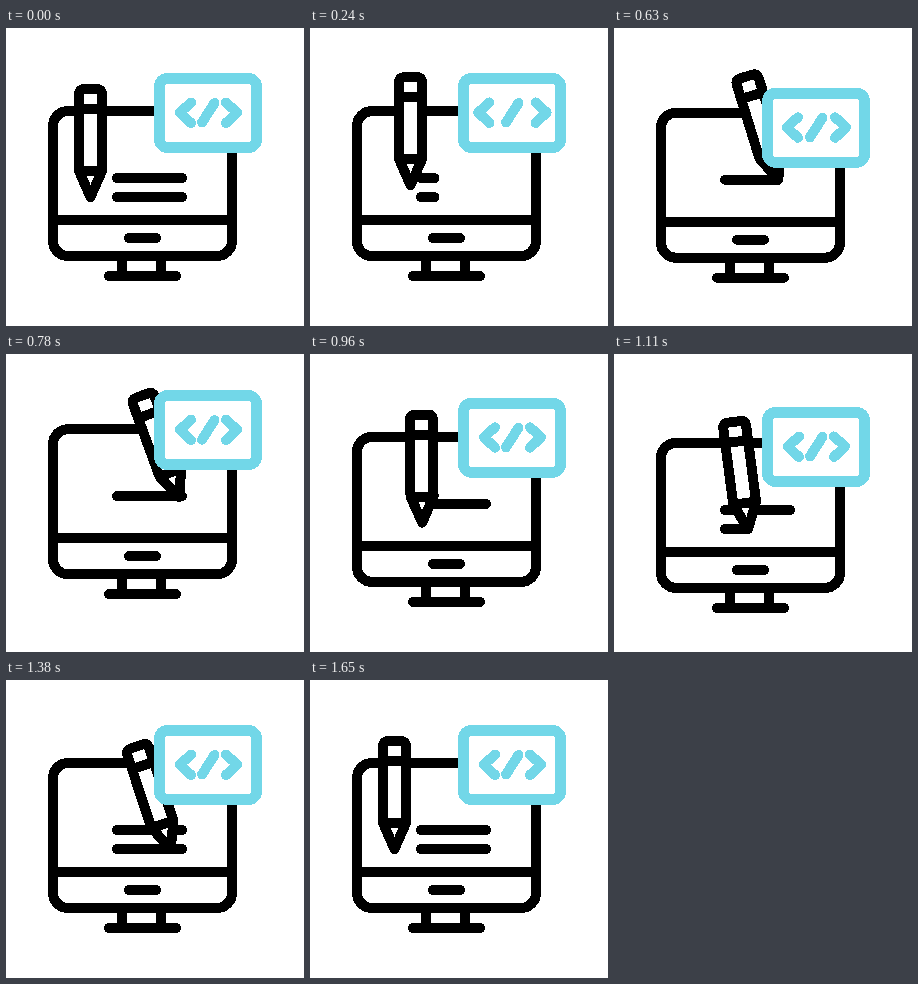
Recreate the animation shown at these times as an HTML page. Size 298 px wide and 298 px high, loop 1710 ms.

```html
<!DOCTYPE html>
<html lang="en">
<head>
<meta charset="utf-8">
<title>Design and code</title>
<style>
  html, body { margin: 0; width: 100%; height: 100%; overflow: hidden; background: #fff; }
  svg { display: block; width: 100vw; height: 100vh; shape-rendering: crispEdges; }
  g { fill: none; stroke: #000; stroke-width: 10; stroke-linecap: round; stroke-linejoin: round; }
  #panel { stroke: #72d7e8; }
  .white { fill: #fff; }
</style>
</head>
<body>
<svg viewBox="0 0 298 298">
  <g id="monitor">
    <rect x="47" y="83" width="179" height="145" rx="15"/>
    <path d="M47 192H226M123 210H150M116 230V246M155 230V246M103 248H170"/>
    <path id="line1"/>
    <path id="line2"/>
    <!-- the pencil's tip is its local zero point -->
    <g id="pencil">
      <path class="white" d="M-11.5 -26V-103Q-11.5 -108 -6.5 -108H6.5Q11.5 -108 11.5 -103V-26L0 0Z"/>
      <path d="M-11.5 -26H11.5M-11.5 -88H11.5"/>
    </g>
  </g>
  <g id="panel">
    <rect class="white" x="153.5" y="50.5" width="97" height="69" rx="8" stroke-width="11"/>
    <path id="open" d="M185 74.5L174 84.5L185 95"/>
    <path d="M208.5 75L196 94.5"/>
    <path id="close" d="M220 74.5L231 84.5L220 95"/>
  </g>
</svg>
<script>
const LOOP = 1710, STEP = 30;
const HOME = 84.5, LEFT = 111, RIGHT = 176, TOP_ROW = 150, LOW_ROW = 169, TILT = -21;

const $ = id => document.getElementById(id);
const ease = p => (1 - Math.cos(Math.PI * p)) / 2;

// Value at time t on eased [time, value] keys
function track(t, keys) {
  if (t <= keys[0][0]) return keys[0][1];
  for (let i = 1; i < keys.length; i++) {
    const [t0, a] = keys[i - 1], [t1, b] = keys[i];
    if (t <= t1) return a + (b - a) * ease((t - t0) / (t1 - t0));
  }
  return keys[keys.length - 1][1];
}

const shift = (id, x, y) => $(id).setAttribute('transform', `translate(${x} ${y})`);

// A row is erased first, then written between two times
function row(id, y, t, from, to) {
  const end = track(t, [[30, RIGHT], [330, LEFT], [from, LEFT], [to, RIGHT]]);
  $(id).setAttribute('d', end > LEFT ? `M${LEFT} ${y}H${end}` : '');
}

function draw(t) {
  shift('monitor', 0, track(t, [[220, 0], [530, 6], [800, -8], [1095, 6], [1360, 0]]));
  shift('panel', 0, track(t, [[300, 0], [600, 16], [820, -11], [1095, 8], [1370, 0]]));

  const spread = track(t, [[30, 0], [390, 9], [700, 0]]);
  shift('open', -spread, 0);
  shift('close', spread, 0);

  row('line1', TOP_ROW, t, 400, 720);
  row('line2', LOW_ROW, t, 980, 1300);

  const x = track(t, [[30, HOME], [400, LEFT], [720, RIGHT], [750, RIGHT], [980, LEFT], [1300, RIGHT], [1650, HOME]]);
  const y = track(t, [[30, LOW_ROW], [390, TOP_ROW], [750, TOP_ROW], [980, LOW_ROW]]);
  const angle = track(t, [[400, 0], [720, TILT], [750, TILT], [980, 0], [1300, TILT], [1650, 0]]);
  $('pencil').setAttribute('transform', `translate(${x} ${y}) rotate(${angle})`);
}

function frame() {
  draw(Math.floor(performance.now() % LOOP / STEP) * STEP);
  requestAnimationFrame(frame);
}
frame();
</script>
</body>
</html>
```
